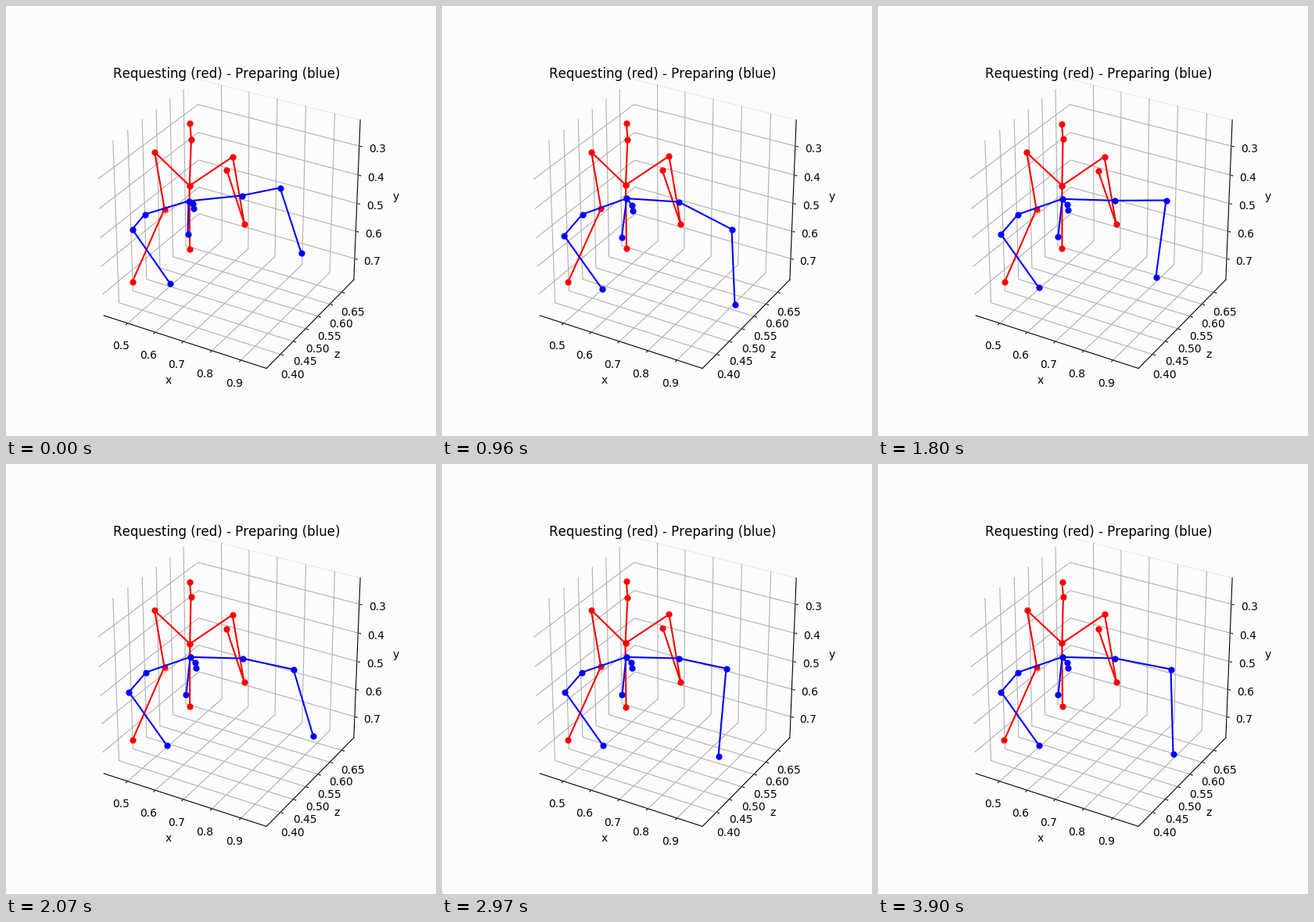
Recreate the animation shown at these times as a matplotlib script. Size 550 by 550 pixels, loop 3930 ms.

```python
import numpy as np
import matplotlib.pyplot as plt
from matplotlib.animation import FuncAnimation

SIZE, STEP, FRAMES = 550, 30, 131
LEFT, TOP, WIDTH, HEIGHT = 68.75, 66.0, 426.25, 423.5
E = 25 / 48               # half side of the box, margin included
DELTA = 1 / 12
PER_POINT = 48 / (72 * (WIDTH + HEIGHT) / 100) * DELTA

plt.rcParams.update({"font.family": "DejaVu Sans", "text.kerning_factor": 6})
fig = plt.figure(figsize=(5.5, 5.5), dpi=100, facecolor="#fcfcfc")
ax = fig.add_axes([0, 0, 1, 1])
ax.set(xlim=(0, SIZE), ylim=(SIZE, 0))
ax.axis("off")


def project(x, y, z):
    """Perspective view of the unit box (azimuth -60, elevation 30) in pixels."""
    az, el = np.radians([-60, 30])
    eye = np.array([np.cos(az) * np.cos(el), np.sin(az) * np.cos(el), np.sin(el)])
    right = np.array([-np.sin(az), np.cos(az), 0])
    up = np.cross(eye, right)
    p = np.array([x, y, z])
    depth = 10 - p @ eye
    px = LEFT + WIDTH * (p @ right / depth + 0.095) / 0.185
    py = TOP + HEIGHT * (1 - (p @ up / depth + 0.095) / 0.185)
    return px, py


def line3d(points, **style):
    ax.plot(*zip(*(project(*p) for p in points)), **style)


def text3d(point, text, va):
    ax.text(*project(*point), text, size=10, ha="center", va=va)


def draw_axis(values, place, corner, index, tickdir, grid, label, fmt):
    """One axis: grid lines, edge, ticks, numbers and name."""
    def at(value, shift=0.0, dirs=()):
        p = list(corner)
        p[index] = value
        for d in dirs:
            p[d] += np.copysign(shift, p[d])
        return p

    others = [i for i in range(3) if i != index]
    for v in values:
        s = place(v)
        line3d(grid(s), color="#b0b0b0", lw=0.8, zorder=1)
        line3d([at(s, 0.1 * DELTA, [tickdir]), at(s, -0.2 * DELTA, [tickdir])],
               color="black", lw=0.8, zorder=2)
        text3d(at(s, 11.5 * PER_POINT, others), fmt % v, "top")
    line3d([at(-E), at(E)], color="black", lw=0.8, zorder=2)
    text3d(at(0, 25 * PER_POINT, others), label, "center")


line3d([(-E, E, E), (E, E, E)], color="#ececec", lw=0.8, zorder=0)
draw_axis(np.arange(5, 10) / 10, lambda v: -0.363 + (v - 0.5) * 1.817,
          (0, -E, -E), 0, 1,
          lambda s: [(s, -E, -E), (s, E, -E), (s, E, E)], "x", "%.1f")
draw_axis(np.arange(8, 14) / 20, lambda v: -0.366 + (v - 0.4) * 2.92,
          (E, 0, -E), 1, 0,
          lambda s: [(E, s, -E), (-E, s, -E), (-E, s, E)], "z", "%.2f")
draw_axis(np.arange(3, 8) / 10, lambda v: 0.358 - (v - 0.3) * 1.837,
          (E, E, 0), 2, 0,
          lambda s: [(-E, -E, s), (-E, E, s), (E, E, s)], "y", "%.1f")
ax.text(LEFT + WIDTH / 2, TOP + 0.08 * HEIGHT - 6 / 0.72,
        "Requesting (red) - Preparing (blue)", size=12, ha="center", va="baseline")

times = np.arange(FRAMES) * STEP
times = np.where((times > 3190) & (times < 3350), 3190, times)  # short pause
rng = np.random.default_rng(4)


def smooth(ts, vs):
    """Monotone cubic through the keys, so turning points never overshoot."""
    h, d = np.diff(ts), np.diff(vs) / np.diff(ts)
    a, b = d[:-1], d[1:]
    turn = a * b <= 0
    inner = np.where(turn, 0, 2 * a * b / np.where(turn, 1, a + b))
    m = np.concatenate([d[:1], inner, d[-1:]])
    k = np.clip(np.searchsorted(ts, times, side="right") - 1, 0, len(h) - 1)
    u = (times - ts[k]) / h[k]
    return (vs[k] + (vs[k + 1] - vs[k]) * u * u * (3 - 2 * u)
            + h[k] * u * (1 - u) * (m[k] * (1 - u) - m[k + 1] * u))


def reach(*keys):
    """Path through (time, x, y) keys."""
    ts, xs, ys = np.array(keys, float).T
    return np.column_stack([smooth(ts, xs), smooth(ts, ys)])


def still(x, y):
    """A joint that only trembles slightly."""
    phase = rng.uniform(0, 2 * np.pi, 2)
    return np.array([x, y]) + 0.5 * np.sin(times[:, None] / 400 + phase)


# The lean rises quickly, then settles half way back.
rise = np.clip(times / 420, 0, 1)
lean = rise * (2 - rise) * (0.5 + 0.5 * np.exp(-np.clip(times - 420, 0, None) / 500))


def leaning(x, y, dx, dy):
    """A joint carried from (x, y) by (dx, dy) at full lean."""
    return np.array([x, y]) + lean[:, None] * np.array([dx, dy])


red = {
    "head": still(235, 150), "chin": still(236.5, 170),
    "neck": still(234.5, 229), "hip": still(235, 310),
    "l_shoulder": still(190, 186.5), "l_elbow": still(202.5, 259),
    "l_wrist": still(161, 352.5), "r_shoulder": still(289.5, 192),
    "r_elbow": still(304.5, 278.5), "r_wrist": still(281.5, 210),
}

blue = {
    "head": leaning(239, 258, 6, 5), "chin": leaning(238, 252, 6, 3),
    "neck": leaning(233, 249, 4, -5), "hip": leaning(232, 291, -4, 7),
    "l_shoulder": leaning(177, 266, 3, 0), "l_elbow": leaning(161, 285, -8, 12),
    "l_wrist": leaning(209, 354, -7, 11), "r_shoulder": leaning(301, 242, 2, 12),
    "r_elbow": reach((0, 350, 232), (420, 371, 299), (960, 370, 285),
                     (1800, 368, 248), (2370, 366, 279), (2970, 363, 261),
                     (3900, 374, 262)),
    "r_wrist": reach((0, 377, 315), (210, 389, 362), (540, 369, 406),
                     (960, 374, 381), (1620, 366, 400), (1800, 355, 346),
                     (2280, 418, 349), (2370, 409, 352), (2700, 361, 366),
                     (2970, 353, 373), (3900, 377, 370)),
}

CHAINS = [
    ("head", "chin", "neck", "hip"),
    ("l_wrist", "l_elbow", "l_shoulder", "neck", "r_shoulder", "r_elbow", "r_wrist"),
]

limbs = []
for body, color in ((red, "red"), (blue, "blue")):
    for chain in CHAINS:
        line, = ax.plot([], [], "o-", color=color, lw=1.5, ms=4.5, mew=1.4, zorder=5)
        limbs.append((line, np.array([body[name] for name in chain]) + 0.5))


def update(i):
    for line, joints in limbs:
        line.set_data(*joints[:, i].T)
    return [line for line, _ in limbs]


anim = FuncAnimation(fig, update, frames=FRAMES, interval=STEP,
                     repeat=True, repeat_delay=0, blit=False)
plt.show()
```
